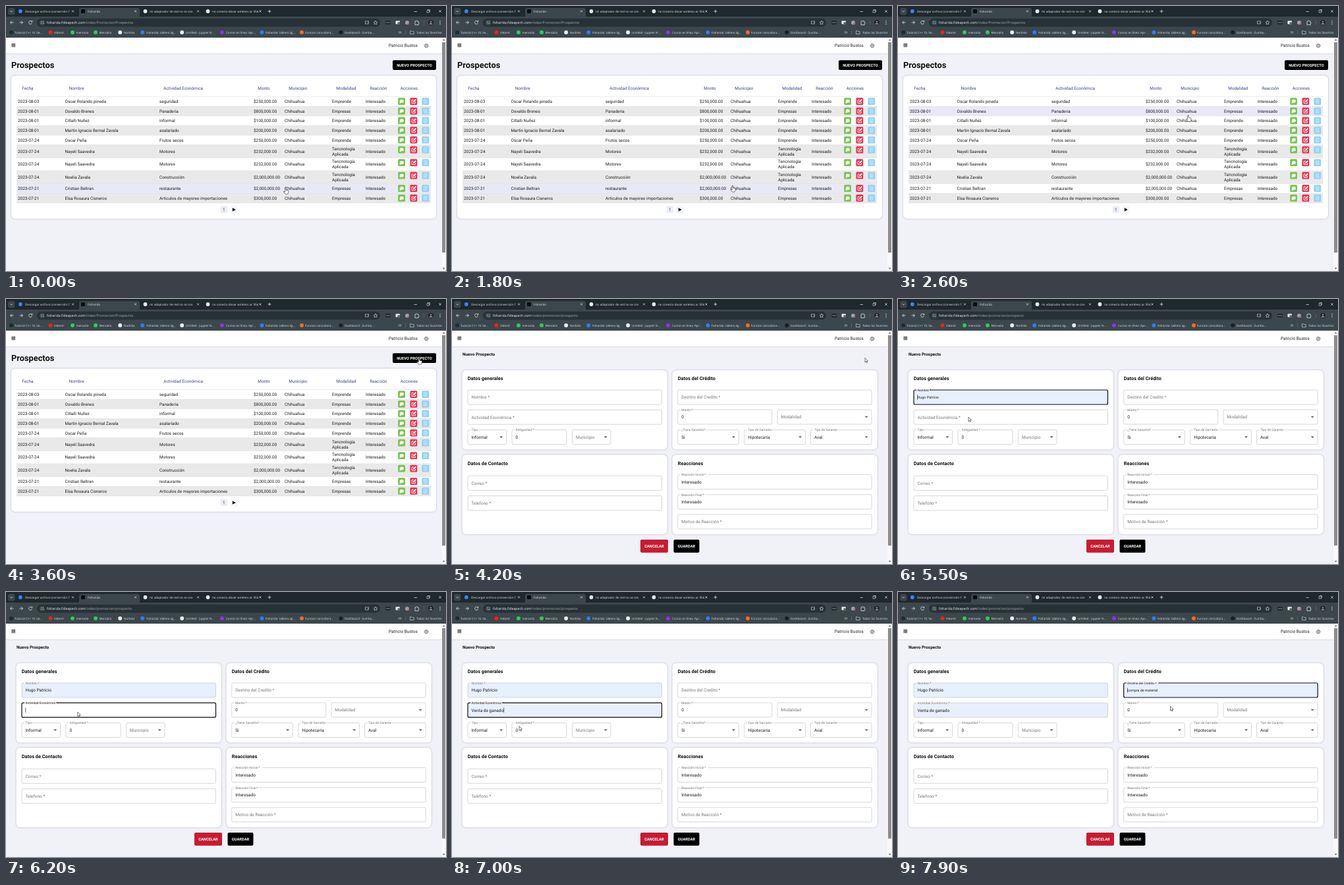
Recreate the animation shown at these times as an HTML page. Size 668x402 px, loop 8000 ms.

```html
<!DOCTYPE html>
<html lang="es">
<head>
<meta charset="utf-8">
<title>Prospectos</title>
<style>
  html, body { margin: 0; width: 100%; height: 100%; overflow: hidden; background: #f1f2f7; }
  svg { display: block; width: 668px; height: 402px; }
  text { font-family: Roboto, sans-serif; text-rendering: geometricPrecision; white-space: pre; }
  .ui { font-family: "Open Sans", "Noto Sans", sans-serif; }
  .card { fill: #fff; filter: drop-shadow(0 0 1.3px rgba(40, 45, 90, .35)); }
</style>
</head>
<body>
<svg id="stage" viewBox="0 0 668 402">
  <g id="chrome"></g>
  <g id="list"></g>
  <g id="form"></g>
  <g id="pointer"></g>
</svg>
<script>
const LOOP = 8000, STEP = 100;
const BRAND = 'Foltarida';
const $ = id => document.getElementById(id);

// Shape helpers; text is placed by its vertical centre.
const text = (x, y, s, size, fill, attrs = '') =>
  `<text x="${x}" y="${(y + size * 0.36).toFixed(2)}" font-size="${size}" fill="${fill}" ${attrs}>${s}</text>`;
const rect = (x, y, w, h, fill, r = 0, attrs = '') =>
  `<rect x="${x}" y="${y}" width="${w}" height="${h}" rx="${r}" fill="${fill}" ${attrs}/>`;
const dot = (x, y, r, fill, attrs = '') => `<circle cx="${x}" cy="${y}" r="${r}" fill="${fill}" ${attrs}/>`;
const line = (d, color, w = 0.8, fill = 'none') =>
  `<path d="${d}" fill="${fill}" stroke="${color}" stroke-width="${w}" stroke-linejoin="round"/>`;
const cross = (x, y, r, color) =>
  line(`M${x - r} ${y - r}l${2 * r} ${2 * r}m0 ${-2 * r}l${-2 * r} ${2 * r}`, color, 0.7);
const ui = (x, y, s, size, fill) => text(x, y, s, size, fill, 'class="ui"');
const bold = 'font-weight="700"';
const middle = 'text-anchor="middle"';

function browser() {
  const ink = '#dfe5e8', bar = '#3b474c';
  let s = rect(0, 0, 668, 17, '#1f282c') + rect(0, 16, 668, 32, bar);
  s += rect(3, 3, 10.5, 10.5, bar, 3) + line('M6.6 7.4l1.7 1.7l1.7 -1.7', ink);
  s += `<path d="M108 17q3 0 3-3V6q0-3 3-3h86q3 0 3 3v8q0 3 3 3z" fill="${bar}"/>`;
  const tabs = [
    [21.8, '#3f83e8', 29, 'Descargar archivo (conversión f', 101.5],
    [117, '#0b0c10', 124, BRAND, 196.5],
    [211.5, '#e6e8ea', 218, 'mi adaptador de red no se con', 291.5],
    [306.5, '#e6e8ea', 313, 'no conecta dovar wireless ac 956', 386],
  ];
  tabs.forEach(([ix, color, tx, label, close], i) => {
    s += i === 1 ? rect(ix - 3, 5, 6, 6, color, 1) : dot(ix, 8, 2.9, color);
    s += ui(tx, 8, label, 4.6, ink) + cross(close, 8, 1.5, ink);
  });
  s += line('M397.5 8h5M400 5.5v5', ink) + line('M619.5 8.5h4.5', ink, 0.7);
  s += line('M639 6.7h3.3v3.3h-3.3zM640.2 6.5v-1h3.3v3.3h-1', ink, 0.6) + cross(659, 8, 1.9, ink);

  s += line('M11.5 25h-5M9 22.5l-2.5 2.5l2.5 2.5', ink) + line('M20.5 25h5M23 22.5l2.5 2.5l-2.5 2.5', ink);
  s += line('M39.2 23.6a2.5 2.5 0 1 0 .3 2M39.7 22v2h-2', ink);
  s += rect(47, 19, 521, 12.5, '#273237', 6.2) + dot(55, 25.2, 4.3, bar);
  s += line('M52.8 24h2.2M56 24h1.4M52.8 26.4h1.2M55.2 26.4h2.2', ink, 0.7);
  s += line('M545.5 23h3M545.5 23v4h5v-1.6M550 22v3m-1.2-1l1.2 1.2l1.2-1.2', ink, 0.6);
  s += line('M561 22.2l.9 2l2.1 .2l-1.6 1.4l.5 2.1l-1.9-1.1l-1.9 1.1l.5-2.1l-1.6-1.4l2.1-.2z', ink, 0.6);
  s += rect(576.5, 22.3, 7.5, 5.6, '#20282c', 1) + [578.3, 580.3, 582.3].map(x => dot(x, 25.1, 0.6, ink)).join('');
  s += rect(591.5, 22.5, 6.5, 5, '#eef0f1', 1) + rect(594.5, 24.5, 3.5, 3, '#50606a', 0.5);
  s += dot(609, 25.3, 3, '#9aa3a8') + dot(611, 27, 1.4, '#c65a45');
  s += line('M621 23.2h1.5a1 1 0 0 1 2 0h1.6v1.8a1 1 0 0 1 0 2v1.6h-5.1z', ink);
  s += line('M634.5 21.5v7', '#66737a', 0.6) + dot(645, 25.2, 4, '#22272b') +
    dot(645, 24, 1.3, '#8f8983') + `<path d="M642.5 28a2.5 2.3 0 0 1 5 0z" fill="#8f8983"/>`;
  s += [23, 25.2, 27.4].map(y => dot(659, y, 0.65, ink)).join('');

  const marks = [
    [8, '#1d2b33', 13, 'Tutorial C++ 10. Se...'],
    [67.5, '#f0201c', 73, 'Vidorel'],
    [101, '#35c65b', 106.5, 'mensalia'],
    [136, '#35c65b', 141.5, 'Mensalia'],
    [173.2, '#e9ecee', 179, 'Norbika'],
    [207.2, '#2f7df0', 213, `${BRAND}: tablero ág...`],
    [267.2, '#e9ecee', 273, 'Untitled - Jupyter N...'],
    [328, '#8a36e0', 334, 'Cursos en línea: Apr...'],
    [388.5, '#2f7df0', 394, `${BRAND}: tablero ág...`],
    [449, '#ee6c2c', 454, 'Funcion consultora...'],
    [508.3, '#1b1f22', 514, 'Dashboard - Zumbo...'],
  ];
  for (const [ix, color, tx, label] of marks) s += dot(ix, 40, 3, color) + ui(tx, 40, label, 4.45, ink);
  s += line('M596 38.3l1.6 1.7l-1.6 1.7M598.4 38.3l1.6 1.7l-1.6 1.7', ink, 0.7);
  s += line('M606.5 37v6', '#66737a', 0.6);
  s += line('M613.5 37.8h2l.8 .9h2.9v3.8h-5.7z', ink, 0.6) + ui(623, 40, 'Todos los favoritos', 4.45, ink);

  s += rect(0, 48, 668, 354, '#f1f2f7') + rect(0, 72, 661, 1, '#d9dae0') + rect(0, 48, 661, 24, '#fff');
  s += rect(8.4, 56.6, 5.8, 5.8, '#858585') + line('M8.4 58.3h5.8M8.4 60.3h5.8', '#6b6b6b', 0.5);
  s += text(581, 60, 'Patricio Bustos', 6.5, '#222');
  s += dot(638, 60.3, 2.2, 'none', 'stroke="#555" stroke-width=".8"') +
    dot(638, 60.3, 3, 'none', 'stroke="#555" stroke-width=".9" stroke-dasharray="1.2 1.15"') + dot(638, 60.3, 0.8, '#555');
  s += rect(661, 48, 7, 354, '#f8f8f8') + rect(662, 55, 5, 319, '#8c8c8c');
  s += '<path d="M662.6 52.4h4l-2-2.4zM662.6 397h4l-2 2.4z" fill="#777"/>';
  return s;
}

const columns = [18, 89.5, 233, 376, 423, 495, 546];
const rows = [
  ['2023-08-03', 'Oscar Rolando pineda', 'seguridad', '250', 'Emprende'],
  ['2023-08-01', 'Osvaldo Brenes', 'Panaderia', '800', 'Empresas'],
  ['2023-08-01', 'Citlalli Nuñez', 'informal', '100', 'Emprende'],
  ['2023-08-01', 'Martin Ignacio Bernal Zavala', 'asalariado', '200', 'Emprende'],
  ['2023-07-24', 'Oscar Peña', 'Frutos secos', '250', 'Emprende'],
  ['2023-07-24', 'Nayeli Saavedra', 'Motores', '232', ''],
  ['2023-07-24', 'Nayeli Saavedra', 'Motores', '232', ''],
  ['2023-07-24', 'Noelia Zavala', 'Construcción', '2,000', ''],
  ['2023-07-21', 'Cristian Beltran', 'restaurante', '2,000', 'Empresas'],
  ['2023-07-21', 'Elsa Rosaura Cisneros', 'Articulos de mayoreo importaciones', '300', 'Empresas'],
];
const edges = [137.3, 152.2, 166.8, 181.4, 196.1, 210.7, 230.4, 249.9, 269.5, 284.2, 298.9];

function actions(y) {
  const x = [595.2, 613.5, 631.4];
  return rect(x[0], y - 5.4, 10.8, 10.8, '#78c552', 1.5) +
    `<ellipse cx="600.8" cy="${y - 0.2}" rx="3" ry="2.5" fill="#fff"/><path d="M598 ${y + 0.5}l-.4 2.8l3-1z" fill="#fff"/>` +
    rect(x[1], y - 5.4, 10.8, 10.8, '#e9304c', 1.5) +
    line(`M619 ${y - 2.2}h-2.8v5.2h5.2v-2.6`, '#fff', 0.9) + line(`M618.2 ${y + 1.2}l.3-1.3l3.1-3.1l1 1l-3.1 3.1z`, '#fff', 0.6, '#fff') +
    rect(x[2], y - 5.4, 10.8, 10.8, '#92d1f4', 1.5) +
    line(`M634.6 ${y - 3}h4.4v6h-4.4zM635.6 ${y - 1.2}h2.4M635.6 ${y + 0.2}h2.4M635.6 ${y + 1.6}h2.4`, '#d9f0fc', 0.7);
}

function listPage() {
  let s = text(8, 89.5, 'Prospectos', 12.8, '#111', bold);
  s += rect(587, 82.3, 66, 14.8, '#000', 2) +
    `<circle id="ripple" cx="627" cy="90" r="7" fill="#fff" opacity="0"/>` +
    text(620, 89.5, 'NUEVO PROSPECTO', 5.8, '#fff', bold + ' ' + middle);
  s += rect(8, 105.5, 645, 217.3, '', 6, 'class="card"');
  const heads = ['Fecha', 'Nombre', 'Actividad Económica', 'Monto', 'Municipio', 'Modalidad', 'Reacción'];
  heads.forEach((h, i) => s += text(columns[i] + 6.3, 125, h, 6.4, '#3c4090'));
  s += text(598.8, 125, 'Acciones', 6.4, '#3c4090');
  rows.forEach(([date, name, job, amount, mode], i) => {
    const top = edges[i], h = edges[i + 1] - top, y = top + h / 2 - 0.1;
    s += rect(16, top, 629, h, i % 2 ? '#e9e9ea' : '#fff', 0, `class="row"`);
    s += rect(16, top - 0.25, 629, 0.5, '#d9d9dc');
    const cells = [date, name, job, `$${amount},000.00`, 'Chihuahua', mode, 'Interesado'];
    cells.forEach((c, k) => s += text(columns[k], y, c, 6.4, '#1d1d1f'));
    if (!mode) s += text(495, y - 4, 'Tencnología', 6.4, '#1d1d1f') + text(495, y + 4, 'Aplicada', 6.4, '#1d1d1f');
    s += actions(mode ? y - 0.1 : y - 2.4);
  });
  s += rect(16, 298.6, 629, 0.5, '#d9d9dc');
  s += rect(325.7, 303.3, 10.4, 11, '#eceef3', 2) + rect(341, 303.3, 10.4, 11, '#f4f5f8', 2);
  s += text(330.9, 308.9, '1', 6.4, '#33366f', middle) + '<path d="M343.8 306.2l5 2.7l-5 2.7z" fill="#000"/>';
  return s;
}

// Outlined input: the label floats onto the border when focused or filled.
function field(x, y, w, label, value = '', o = {}) {
  const h = 22, float = value || o.focus, tx = x + 5.5;
  let s = rect(x, y, w, h, o.blue ? '#e8effd' : '#fff', 2) +
    rect(x, y, w, h, 'none', 2, `stroke="${o.focus ? '#0d0d0f' : '#bcbcbf'}" stroke-width="${o.focus ? 1.2 : 0.6}"`);
  if (float) {
    s += rect(tx - 1.5, y - 1, label.length * 2.2 + 2.5, 1.7, '#fff') + text(tx, y, label, 4.85, o.focus ? '#222' : '#707073');
    s += text(tx, y + 11, value, o.preview ? 5.35 : 6.5, '#1d1d1f');
  } else s += text(tx, y + 11, label, 6.5, '#77777a');
  if (o.select) s += `<path d="M${x + w - 10.3} ${y + 9.8}h5l-2.5 2.6z" fill="#666"/>`;
  if (o.caret != null) s += rect(tx + o.caret, y + 7.3, 0.6, 7.4, '#000');
  return s;
}

function formPage() {
  const select = { select: true };
  let s = text(16, 83.6, 'Nuevo Prospecto', 6.4, '#111', bold);
  const cards = [
    [15.5, 108, 'Datos generales'], [334.5, 108, 'Datos del Crédito'],
    [15.5, 236.3, 'Datos de Contacto'], [334.5, 236.3, 'Reacciones'],
  ];
  for (const [x, y, title] of cards)
    s += rect(x, y, 311.3, 120.6, '', 6, 'class="card"') + text(x + 8.3, y + 12.6, title, 7.4, '#111', bold);
  s += field(24, 198.5, 58.5, 'Tipo', 'Informal', select) + field(91, 198.5, 83, 'Antiguedad *', '0') +
    field(182.5, 198.5, 58.5, 'Municipio', '', select);
  s += field(342.7, 168, 143, 'Monto *', '0') + field(494, 168, 143, 'Modalidad', '', select);
  s += field(342.7, 198.5, 92.6, '¿Tiene Garantía?', 'Si', select) +
    field(443.8, 198.5, 92.6, 'Tipo de Garnatía', 'Hipotecaria', select) +
    field(544.5, 198.5, 92.6, 'Tipo de Garante', 'Aval', select);
  s += field(24, 268.3, 294.5, 'Correo *') + field(24, 298.6, 294.5, 'Telefono *');
  s += field(342.7, 266.5, 294.5, 'Reacción Inicial *', 'Interesado') +
    field(342.7, 296.8, 294.5, 'Reacción Final *', 'Interesado') + field(342.7, 326.8, 294.5, 'Motivo de Reacción *');
  s += rect(286, 365, 42, 19.8, '#c81b32', 2) + text(307, 375, 'CANCELAR', 5.8, '#fff', bold + ' ' + middle);
  s += rect(336.5, 365, 39, 19.8, '#000', 2) + text(356, 375, 'GUARDAR', 5.8, '#fff', bold + ' ' + middle);
  return s + '<g id="inputs"></g>';
}

// Autofilled inputs with the times of focus, suggestion, choice and blur.
const inputs = [
  { x: 24, y: 138, label: 'Nombre *', value: 'Hugo Patricio', end: 39, times: [5200, 5400, 5700, 6000] },
  { x: 24, y: 168.2, label: 'Actividad Económica *', value: 'Venta de ganado', end: 49, times: [6000, 6400, 6700, 7500] },
  { x: 342.7, y: 138, label: 'Destino del Credito *', value: 'compra de material', end: 54, times: [7500, 7900, 9000, 9000] },
];
function drawInput({ x, y, label, value, end, times: [focus, hint, pick, blur] }, t) {
  const active = t >= focus && t < blur;
  return field(x, y, 294.5, label, t >= hint ? value : '', {
    focus: active, blue: t >= hint, preview: t < pick,
    caret: active ? (t < pick ? 0 : end) : null,
  });
}

// Pointer tip: time, x, y.
const path = [
  [0, 424.5, 275.5], [300, 425.5, 276], [1700, 425.5, 276], [2600, 440.5, 165.5], [3300, 627, 89.3],
  [4200, 627, 89.3], [4800, 395, 165], [5100, 130, 150], [5200, 130, 150], [5500, 107, 179],
  [5800, 107, 179], [6000, 110, 178], [6100, 110, 178], [6500, 102, 203.5], [7000, 102, 203.5],
  [7400, 390, 150], [7500, 390, 150], [7900, 413.5, 173.5], [8000, 413.5, 173.5],
];
function tipAt(t) {
  const i = path.findIndex((p, k) => k && t <= p[0]);
  const [t0, x0, y0] = path[i - 1], [t1, x1, y1] = path[i];
  const u = (t - t0) / (t1 - t0), e = u * u * (3 - 2 * u);
  return [x0 + (x1 - x0) * e, y0 + (y1 - y0) * e];
}
const pointers = {
  arrow: line('M0 0v6.6l1.5-1.4l1 2.3l1-.4l-1-2.3h2z', '#222', 0.6, '#fff'),
  hand: line('M-.8 .5q.8-1 1.6 0v3.2l3 .7q.8 .3 .7 1.2l-.5 2.6l-.8 1.6h-3.6l-2.8-3.5q.2-1 1.2-.4l1.2 .8z', '#222', 0.6, '#fff'),
  beam: line('M-1.4-3.5h2.8M0-3.5v7M-1.4 3.5h2.8', '#222', 0.6),
};
const overInput = [[5000, 5300], [5900, 6200], [7300, 7600]];

$('chrome').innerHTML = browser() + '<g id="url"></g>';
$('list').innerHTML = listPage();
$('form').innerHTML = formPage();
const rowRects = [...document.querySelectorAll('.row')];

function draw(t) {
  const onList = t < 4000, [x, y] = tipAt(t);
  const hover = onList ? edges.findIndex((e, i) => y >= e && y < edges[i + 1]) : -1;
  $('list').style.display = onList ? '' : 'none';
  $('form').style.display = onList ? 'none' : '';
  const route = onList ? '/index/Promocion/Prospectos' : '/index/promocion/prospecto';
  $('url').innerHTML = ui(62, 25.2,
    `${BRAND.toLowerCase()}.fideapech.com<tspan fill="#a3adb2">${route}</tspan>`, 5.27, '#eef2f4');
  rowRects.forEach((r, i) => r.setAttribute('fill', i === hover ? '#e9e9f5' : i % 2 ? '#e9e9ea' : '#fff'));
  $('ripple').setAttribute('opacity', t === 3500 ? 0.2 : 0);
  $('inputs').innerHTML = inputs.map(f => drawInput(f, t)).join('');
  const onButton = onList && x > 587 && y > 82 && y < 97;
  const kind = hover >= 0 || onButton ? 'hand' : overInput.some(([a, b]) => t >= a && t < b) ? 'beam' : 'arrow';
  $('pointer').innerHTML = `<g transform="translate(${x} ${y})">${pointers[kind]}</g>`;
}

const start = performance.now();
let shown = -1;
function tick() {
  const t = Math.floor((performance.now() - start) % LOOP / STEP) * STEP;
  if (t !== shown) draw(shown = t);
  requestAnimationFrame(tick);
}
tick();
</script>
</body>
</html>
```
